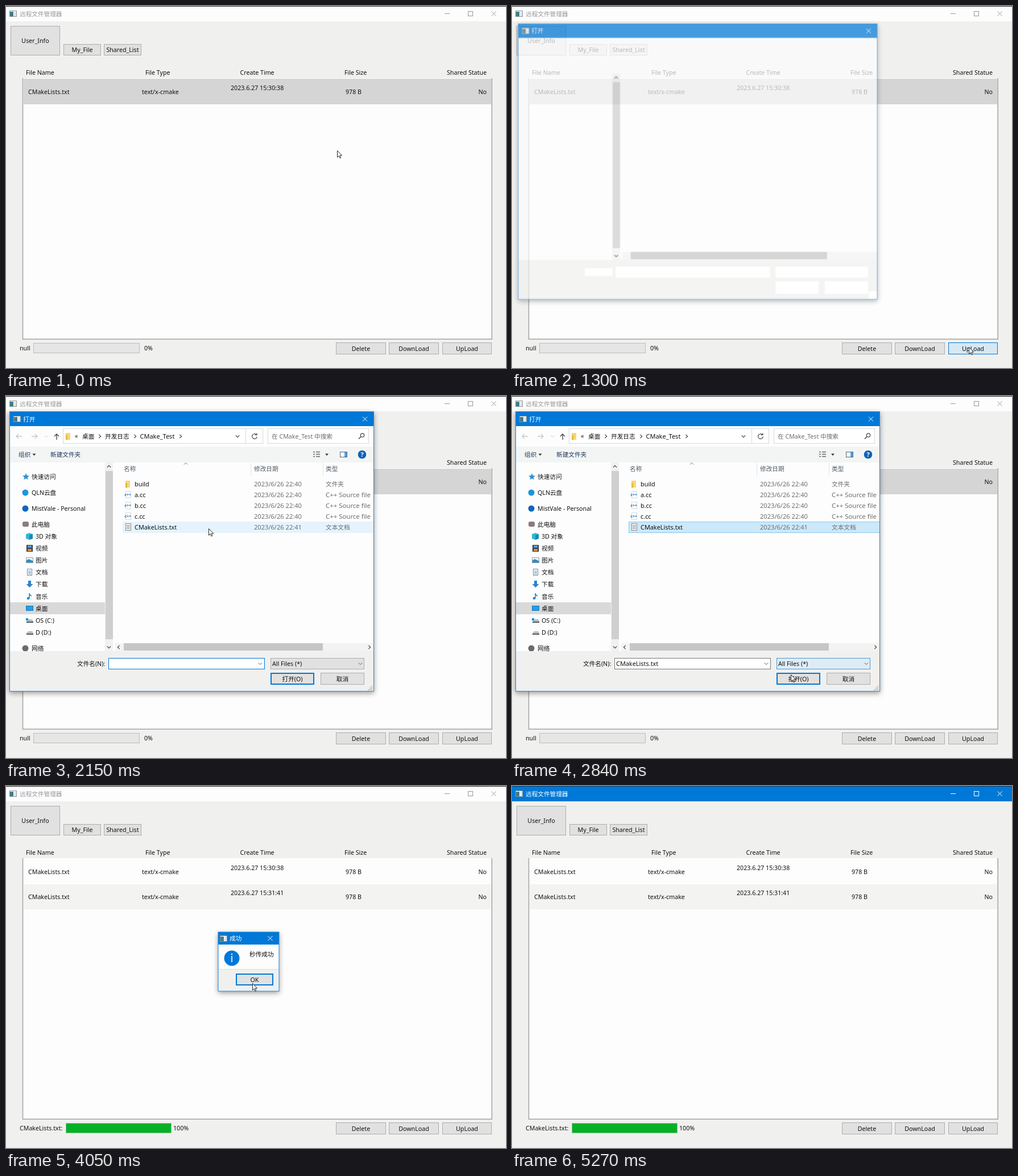
Write an HTML page that moves like this. It is 879x637 px and loops after 5310 ms.

```html
<!DOCTYPE html>
<html lang="zh-CN">
<head>
<meta charset="utf-8">
<title>远程文件管理器</title>
<style>
  html, body { margin: 0; width: 100%; height: 100%; overflow: hidden; background: #f0f0ef; }
  svg { display: block; width: 879px; height: 637px; }
  text { font-family: "Noto Sans", "Noto Sans CJK SC", "Noto Sans CJK", sans-serif; white-space: pre; }
  .shadow { filter: drop-shadow(0 3px 5px rgba(0, 0, 0, .4)); }
</style>
</head>
<body>
<svg id="stage" viewBox="0 0 879 637"></svg>
<script>
const LOOP = 5310;
const BLUE = '#0078d7', INK = '#111', GRAY = '#6d6d6d';

// Drawing helpers: each returns SVG markup; text is centred vertically on y.
const box = (x, y, w, h, fill, stroke, sw = 1, extra = '') => stroke
  ? `<rect x="${x + sw / 2}" y="${y + sw / 2}" width="${w - sw}" height="${h - sw}" fill="${fill}" stroke="${stroke}" stroke-width="${sw}" ${extra}/>`
  : `<rect x="${x}" y="${y}" width="${w}" height="${h}" fill="${fill}" ${extra}/>`;
const text = (x, y, s, { fill = INK, size = 10.65, anchor = 'start', extra = '' } = {}) =>
  `<text x="${x}" y="${y + 4}" font-size="${size}" fill="${fill}" text-anchor="${anchor}" ${extra}>${s}</text>`;
const line = (d, stroke = '#444', sw = 1, extra = '') =>
  `<path d="${d}" fill="none" stroke="${stroke}" stroke-width="${sw}" ${extra}/>`;
const fill = (d, color, extra = '') => `<path d="${d}" fill="${color}" ${extra}/>`;
const dot = (x, y, r, color) => `<circle cx="${x}" cy="${y}" r="${r}" fill="${color}"/>`;
const group = (id, body, extra = '') => `<g id="${id}" ${extra}>${body}</g>`;
const button = (x, y, w, h, label, id) => box(x, y, w, h, '#e1e1e1', '#adadad') +
  (id ? box(x, y, w, h, '#e5f1fb', BLUE, 1, `id="${id}"`) : '') +
  text(x + w / 2, y + h / 2, label, { anchor: 'middle' });
const cross = (x, y, color, r = 4) =>
  line(`M${x - r} ${y - r}l${2 * r} ${2 * r}m0 ${-2 * r}l${-2 * r} ${2 * r}`, color);
const chevron = (x, y, dir, color = '#444', sw = 1.2) => {
  const turn = { down: 0, left: 90, up: 180, right: 270 }[dir];
  return line('M-3.2 -1.6L0 1.6L3.2 -1.6', color, sw, `transform="translate(${x} ${y}) rotate(${turn})"`);
};
const triangle = (x, y) => fill(`M${x - 3} ${y - 1.5}h6l-3 3.5z`, '#333');
const appIcon = (x, y) => box(x, y, 13, 11, '#fff', '#8b9299') + box(x + 1, y + 2, 6, 8, '#3f7f86') +
  box(x + 8, y + 2, 4, 8, '#dfe6ea');
const folder = (x, y) => box(x, y, 8, 12, '#f7d774') + fill(`M${x} ${y + 12}v-9l3 2v8z`, '#e8b93f');

function titleBar() {
  const controls = color => line('M771 13.5h9', color) +
    box(812, 9, 9, 9, 'none', color) + cross(857.5, 13.5, color);
  return box(0, 0, 879, 27, '#fdfdfd') + box(0, 0, 879, 1, '#222') +
    text(24, 13.5, '远程文件管理器', { fill: '#999' }) + controls('#999') +
    group('active', box(0, 0, 879, 27, BLUE) + box(0, 0, 879, 1, '#173a5a') +
      text(24, 13.5, '远程文件管理器', { fill: '#fff' }) + controls('#fff')) + appIcon(6, 8);
}

function fileRow(y, time) {
  return text(39, y, 'CMakeLists.txt') + text(239, y, 'text/x-cmake') +
    text(395, y - 7, time) + text(597, y, '978 B') + text(845, y, 'No', { anchor: 'end' });
}

function mainWindow() {
  const heads = [[35, 'File Name'], [245, 'File Type'], [411.5, 'Create Time'], [595, 'File Size'], [775, 'Shared Statue']];
  return box(0, 0, 879, 637, '#f0f0ef') + titleBar() +
    button(8, 35, 87, 52, 'User_Info') + button(101, 67, 66, 20, 'My_File') + button(172, 67, 66, 20, 'Shared_List') +
    heads.map(([x, s]) => text(x, 117, s)).join('') +
    box(29, 127, 826, 460, '#fdfdfd') + line('M29.5 127V586.2H854.2V127', '#a3a3a3', 1.5) +
    box(31, 128, 822, 45, '#d5d5d5', null, 1, 'id="picked"') + fileRow(151, '2023.6.27 15:30:38') +
    group('second', box(31, 173, 822, 44, '#f3f3f2') + fileRow(194.5, '2023.6.27 15:31:41')) +
    group('idle', text(24, 602, 'null') + box(48, 593, 187, 18, '#e6e6e6', '#bcbcbc') + text(243, 602, '0%')) +
    group('done', text(24, 602, 'CMakeLists.txt:') + box(105, 593, 186, 18, '#06b025', '#8fc49a') + text(294, 602, '100%')) +
    button(580, 592, 88, 21, 'Delete') + button(673, 592, 88, 21, 'DownLoad') + button(767, 592, 87, 21, 'UpLoad', 'upHover');
}

function sideIcons() {
  const screen = (x, y, color) => box(x, y, 13, 9, color, '#1b78b4');
  const disk = y => fill(`M36 ${y}l3 -3h7l2 3v3h-12z`, '#b9bdc0') + box(36, y + 1, 12, 2, '#55595c');
  return fill('M35 136l1.7 4 4.3.3-3.3 2.8 1 4.2-3.7-2.3-3.7 2.3 1-4.2-3.3-2.8 4.3-.3z', '#2f8fd6') +
    dot(34, 170, 5.5, '#1a96e0') + dot(34, 198, 5.5, '#0a66c0') +
    box(29, 221, 11, 9, '#8a7a86', null, 1, 'rx="3"') +
    fill('M35 243l6-2 6 2v8l-6 2-6-2z', '#35b6d8') + fill('M41 245l6-2v8l-6 2z', '#178bab') +
    box(36, 262, 11, 12, '#333d4d') + box(38, 263, 7, 4, '#5c9ad6') + box(38, 269, 7, 4, '#d98b4a') +
    box(35, 284, 13, 10, '#eef6fb', '#8aa') + fill('M36 293v-4l4-2 7 3v3z', '#3f86bd') +
    box(37, 304, 9, 12, '#fff', '#789') + line('M39 308h5m-5 2.5h5m-5 2.5h5', '#58a') +
    fill('M39 325h5v6h3.5l-6 6-6-6h3.5z', '#2b84d4') +
    dot(39, 356, 2.3, '#1f83d8') + line('M41 356v-9q0 3 4 5', '#1f83d8', 1.5) +
    screen(35, 369, '#20a0ee') + disk(396) + box(35, 391, 4, 4, '#1296db') + disk(417) +
    dot(34, 444, 5.5, '#6a6a6a');
}

function sidebar() {
  const top = ['快速访问', 'QLN云盘', 'MistVale - Personal', '此电脑'];
  const places = ['3D 对象', '视频', '图片', '文档', '下载', '音乐', '桌面', 'OS (C:)', 'D (D:)'];
  return box(7, 363, 167, 21, '#d9d9d9') +
    top.map((s, i) => text(45, 142 + i * 28, s)).join('') +
    places.map((s, i) => text(52, 247 + i * 21.1, s)).join('') +
    text(45, 444, '网络') + sideIcons();
}

function fileList() {
  const rows = [['build', '文件夹'], ['a.cc', 'C++ Source file'], ['b.cc', 'C++ Source file'],
    ['c.cc', 'C++ Source file'], ['CMakeLists.txt', '文本文档']];
  const sourceIcon = y => box(210, y - 7, 10, 13, '#fff', '#d5dbe0') +
    text(208.5, y - 2, 'c++', { size: 7, fill: '#1c6ca8', extra: 'font-weight="700"' });
  const noteIcon = y => box(210, y - 7, 10, 13, '#fafafa', '#8a8a8a') +
    line(`M212 ${y - 3.5}h6m-6 2h6m-6 2h6m-6 2h6`, '#999');
  const heads = [[207, '名称'], [436, '修改日期'], [562, '类型']];
  return heads.map(([x, s]) => text(x, 128, s, { fill: '#4c5a67' })).join('') +
    chevron(316, 119, 'up', '#777', 1) + line('M430.5 118V140M557.5 118V140', '#e2e2e2') +
    box(205, 221, 441, 20, '#e5f3fd', null, 1, 'id="rowHover"') +
    box(205, 221, 442, 20, '#cce8fb', '#8fc8ee', 1, 'id="rowPick"') +
    rows.map(([name, kind], i) => {
      const y = 155 + i * 19, icon = i === 0 ? folder(210, y - 6) : i < 4 ? sourceIcon(y) : noteIcon(y);
      return icon + text(226, y, name, { size: 10.9 }) +
        text(436, y, `2023/6/26 22:4${i === 4 ? 1 : 0}`, { fill: GRAY, size: 11.1 }) +
        text(562, y, kind, { fill: GRAY, size: i && i < 4 ? 11.4 : 10.65 });
    }).join('');
}

function navigation() {
  const arrow = (x, y, s, color) => line(s === 'up'
    ? `M${x} ${y + 5}v-10m-4 4l4 -4 4 4`
    : `M${x - 5 * s} ${y}h${10 * s}m${-4 * s} -4l${4 * s} 4 ${-4 * s} 4`, color, 1.3);
  return arrow(23, 71, -1, '#c8c8c8') + arrow(50, 71, 1, '#c8c8c8') + chevron(71, 71, 'down', '#ccc', 1) +
    arrow(89, 72, 'up', '#444') +
    box(100, 57, 352, 27, '#fff', '#d9d9d9') + line('M421.5 57V84', '#d9d9d9') + folder(105, 65) +
    text(121, 70, '«') + text(134, 71, '桌面') + chevron(165, 71, 'right') + text(174, 71, '开发日志') +
    chevron(227, 71, 'right') + text(235.5, 71, 'CMake_Test', { size: 11 }) + chevron(307, 71, 'right') +
    chevron(407, 71, 'down') + line('M440 68a4.3 4.3 0 1 0 1.2 3.5M441 65.5v3h-3.3', '#444', 1.2) +
    box(460, 57, 178, 27, '#fff', '#d9d9d9') + text(467, 71, '在 CMake_Test 中搜索', { fill: GRAY }) +
    `<circle cx="626.5" cy="69" r="3.2" fill="none" stroke="#444" stroke-width="1.2"/>` + line('M624 71.5l-4 4', '#444', 1.5) +
    box(7, 89, 639, 28, '#f3f5f5') + text(22, 103, '组织', { fill: '#1e395b' }) + triangle(49.5, 103) +
    text(78, 103, '新建文件夹', { fill: '#1e395b' }) +
    line('M540 98.5h3m2 0h7M540 102.5h3m2 0h7M540 106.5h3m2 0h7', '#666', 1.4) + triangle(564, 103) +
    box(587, 98, 13, 10, '#fff', '#567') + box(595, 99, 4, 8, '#4da3e6') +
    dot(626, 103, 7.3, '#0a63b4') +
    text(626, 103, '?', { fill: '#fff', size: 11, anchor: 'middle', extra: 'font-weight="700"' });
}

function footer() {
  return text(125, 471, '文件名(N):') +
    box(180, 461, 275, 20, '#fff', '#7a7a7a') + box(180, 461, 275, 20, 'none', BLUE, 1, 'id="focus"') +
    text(183, 471, 'CMakeLists.txt', { size: 10.9, extra: 'id="typed"' }) + chevron(447, 471, 'down', '#555', 1) +
    box(465, 461, 165, 20, '#e1e1e1', '#adadad') + box(465, 461, 165, 20, '#e0edf6', '#4a9ad6', 1, 'id="comboHover"') +
    text(468, 471, 'All Files (*)') + chevron(623, 471, 'down', '#555', 1) +
    box(465, 487, 77, 21, '#e1e1e1') + box(465, 487, 77, 21, '#e5f1fb', null, 1, 'id="openHover"') +
    box(465, 487, 77, 21, 'none', BLUE, 2) + text(503.5, 497.5, '打开(O)', { anchor: 'middle' }) +
    button(553, 487, 77, 21, '取消') +
    [0, 1, 2].map(i => [0, 1, 2].map(j => i + j > 1 ? box(636 + i * 3, 510 + j * 3, 2, 2, '#b5b5b5') : '').join('')).join('');
}

function openDialog() {
  const scrollbars = box(174, 117, 14, 332, '#f1f1f1') + box(175, 132, 13, 296, '#cfcfcf') +
    chevron(181, 124, 'up') + chevron(181, 442, 'down') +
    box(192, 435, 454, 14, '#f3f3f3') + box(207, 435, 350, 13, '#c6c6c6');
  const blanks = [[125, 464, 50, 14], [180, 461, 275, 20], [465, 461, 165, 20], [465, 487, 77, 23], [553, 487, 77, 23], [632, 505, 14, 14]];
  return box(6, 27, 641, 493, '#fdfdfd', null, 1, 'class="shadow"') +
    box(7, 449, 639, 70, '#f0f0ef') + scrollbars +
    group('blanks', blanks.map(b => box(...b, '#fff')).join('')) +
    group('content', navigation() + group('', sidebar(), 'clip-path="url(#side)"') + fileList() +
      chevron(198, 442, 'left') + chevron(639, 442, 'right') + footer()) +
    box(6, 27, 641, 26, BLUE) + appIcon(13, 35) + text(30, 40.5, '打开', { fill: '#fff' }) + cross(631, 40.5, '#fff') +
    box(6, 27, 641, 493, 'none', '#2b86cf');
}

function messageBox() {
  return box(373, 257, 107, 104, '#fdfdfd', null, 1, 'class="shadow"') + box(373, 257, 107, 22, BLUE) +
    appIcon(376, 263) + text(393, 268, '成功', { fill: '#fff' }) + cross(464.5, 268, '#fff') +
    dot(397, 303, 13.5, BLUE) + box(396.2, 299, 1.6, 11, '#fff') + dot(397, 296, 1.2, '#fff') +
    text(428, 296, '秒传成功') + box(373, 322, 107, 39, '#f0f0ef') + line('M373 322.5H480', '#dfdfdf') +
    box(404, 330, 66, 21, '#e1e1e1') + box(404, 330, 66, 21, '#e5f1fb', null, 1, 'id="okHover"') +
    box(404, 330, 66, 21, 'none', BLUE, 2) + text(437, 340.5, 'OK', { anchor: 'middle' }) +
    box(372.5, 256.5, 108, 105, 'none', '#2b86cf');
}

const stage = document.getElementById('stage');
stage.innerHTML = '<defs><clipPath id="side"><rect x="7" y="117" width="167" height="332"/></clipPath></defs>' +
  mainWindow() + group('dialog', openDialog()) + group('message', messageBox()) +
  '<path id="cursor" d="M.5 .5V12.2L3.2 9.7 5 13.8 6.8 13 5 9H8.6Z" fill="#fff" stroke="#111" stroke-width=".9"/>';

const parts = {};
stage.querySelectorAll('[id]').forEach(el => { if (el.id) parts[el.id] = el; });

// Timing helpers.
const ramp = (t, from, to) => Math.min(1, Math.max(0, (t - from) / (to - from)));
const smooth = k => k * k * (3 - 2 * k);
const pulse = (t, a, b, c, d) => ramp(t, a, b) * (1 - ramp(t, c, d));
const show = (id, on) => parts[id].setAttribute('opacity', +on);

const track = [[0, 582, 254], [210, 793, 578], [350, 793, 578], [480, 803, 600], [1490, 803, 600], [2080, 356, 233],
  [2560, 356, 233], [2830, 490, 490], [3660, 490, 490], [4050, 433, 347], [4320, 433, 347], [4680, 800, 600], [4860, 815, 645]];

function pointer(t) {
  const i = track.findIndex(p => p[0] > t);
  if (i < 0) return track[track.length - 1].slice(1);
  const [t0, x0, y0] = track[i - 1], [t1, x1, y1] = track[i];
  const k = smooth(ramp(t, t0, t1));
  return [x0 + (x1 - x0) * k, y0 + (y1 - y0) * k];
}

function popup(id, t, opens, closes, cx, cy) {
  const k = pulse(t, opens, opens + 140, closes, closes + 100);
  const s = 0.95 + 0.05 * k;
  show(id, k);
  parts[id].setAttribute('transform', `translate(${cx * (1 - s)} ${cy * (1 - s)}) scale(${s})`);
}

function render(t) {
  const updated = t >= 3440, chosen = t >= 2400, loaded = t >= 1440;
  show('active', (t >= 680 && t < 1240) || t >= 4380);
  show('picked', !updated);
  show('second', updated);
  show('idle', !updated);
  show('done', updated);
  show('upHover', Math.max(pulse(t, 400, 560, 1540, 1740), pulse(t, 4600, 4760, 4840, 4990)));
  parts.upHover.setAttribute('fill', t >= 700 && t < 2000 ? '#d5e8f4' : '#e5f1fb');

  popup('dialog', t, 1200, 3190, 326.5, 273.5);
  show('blanks', !loaded);
  show('content', loaded);
  show('rowHover', t >= 2000 && !chosen);
  show('rowPick', chosen);
  show('focus', !chosen);
  show('typed', chosen);
  show('comboHover', pulse(t, 2730, 2800, 2840, 3000));
  show('openHover', ramp(t, 2840, 3000));

  popup('message', t, 3480, 4330, 426.5, 309);
  show('okHover', ramp(t, 4050, 4200));

  const [x, y] = pointer(t);
  parts.cursor.setAttribute('transform', `translate(${x.toFixed(1)} ${y.toFixed(1)})`);
}

const start = performance.now();
function tick() {
  render((performance.now() - start) % LOOP);
  requestAnimationFrame(tick);
}
render(0);
requestAnimationFrame(tick);
</script>
</body>
</html>
```
